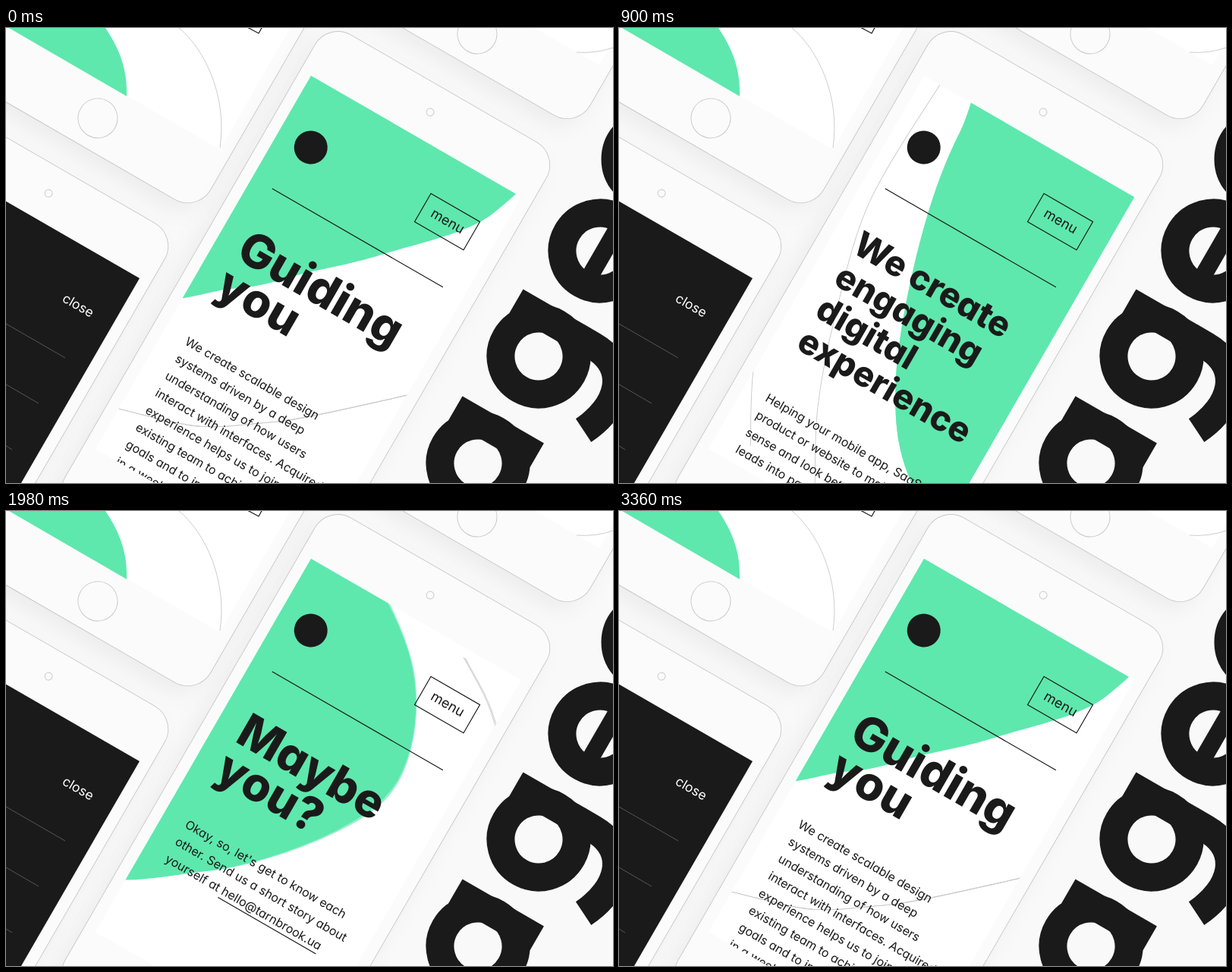
An HTML page that plays this animation: 800 px wide and 600 px high, repeating every 3600 ms.

```html
<!DOCTYPE html>
<html lang="en">
<head>
<meta charset="utf-8">
<title>Phone screens</title>
<style>
html, body { margin: 0; height: 100%; overflow: hidden; background: #f9f9f9; }
svg { display: block; width: 100%; height: 100%; }
text { font-family: Inter, Lato, sans-serif; font-feature-settings: "cv11"; fill: #1a1a1a; }
.head { font-weight: 800; }
.body { font-size: 16px; }
.thin { fill: none; stroke: #c8c8c8; stroke-width: .9; }
.ink { fill: none; stroke: #1a1a1a; stroke-width: 1.2; }
.shade { filter: drop-shadow(-6px 14px 14px #0000000d); }
</style>
</head>
<body>
<svg viewBox="0 0 800 600">
  <defs>
    <g id="phone">
      <rect class="shade" x="-16" y="-73" width="352" height="728" rx="35" fill="#fbfbfb"/>
      <rect class="thin" x="-16" y="-73" width="352" height="728" rx="35"/>
      <circle class="thin" cx="160" cy="-37" r="5"/>
      <circle class="thin" cx="160" cy="613" r="26"/>
      <rect width="320" height="568" fill="#fff"/>
    </g>
    <clipPath id="screen"><rect width="320" height="568"/></clipPath>
  </defs>

  <!-- neighbouring phones -->
  <use href="#phone" transform="translate(288.9 -491.9) rotate(30)"/>
  <path d="M4 0H131C150 28 160 55 159 90Z" fill="#5ee8ad"/>
  <path class="thin" d="M228 0C262 28 292 90 282 158"/>
  <path class="ink" d="M318 -1L333 7L338 -2"/>
  <use href="#phone" transform="translate(788.9 -602.9) rotate(30)"/>
  <path class="thin" d="M752 32Q776 34 800 26"/>
  <use href="#phone" transform="translate(-101 170) rotate(30)"/>
  <path d="M0 228.5L176 330L20 600H0Z" fill="#1a1a1a"/>
  <path d="M0 390L78 435M0 470L43 495M0 551L8 556" stroke="#555" fill="none"/>
  <text transform="translate(73 360) rotate(30)" font-size="17.5" style="fill:#fff">close</text>

  <!-- oversized lettering running upwards -->
  <g fill="none" stroke="#1a1a1a" stroke-width="37">
    <g transform="translate(622 574) rotate(-60)">
      <circle r="50"/><path d="M48-62V62"/>
    </g>
    <g transform="translate(702 433) rotate(-60)">
      <circle r="50"/><path d="M48-62V55C48 113-5 125-55 100"/>
    </g>
    <g transform="translate(783 294) rotate(-60)">
      <circle r="50"/><path d="M-50 5H50" stroke-width="23"/>
    </g>
    <circle cx="852" cy="173" r="49"/>
  </g>

  <!-- main phone -->
  <g transform="translate(402 63) rotate(30)">
    <use href="#phone"/>
    <g clip-path="url(#screen)">
      <path id="trail" fill="#5ee8ad" opacity=".65"/>
      <path id="blob" fill="#5ee8ad"/>
      <path id="line" class="thin"/>
      <path id="line2" class="thin"/>
      <g id="pages"></g>
    </g>
    <circle cx="47" cy="82" r="22" fill="#1a1a1a"/>
    <path class="ink" d="M30 154.5H290M214.5 55.5H289V98.5H214.5Z"/>
    <text x="228" y="82" font-size="18">menu</text>
  </g>
</svg>
<script>
const $ = id => document.getElementById(id);
const LOOP = 3600, FADE = 120;

const pages = [
  { size: 62, y: 258, step: 56, head: ['Guiding', 'you'], bodyY: 390,
    body: ['We create scalable design', 'systems driven by a deep', 'understanding of how users',
      'interact with interfaces. Acquired', 'experience helps us to join the', 'existing team to achieve your',
      'goals and to increase value', 'in a week'] },
  { size: 46, y: 249, step: 49, head: ['We create', 'engaging', 'digital', 'experience'], bodyY: 476,
    body: ['Helping your mobile app, SaaS', 'product or website to make', 'sense and look better, turn', 'leads into paying users'] },
  { size: 62, y: 259, step: 56, head: ['Maybe', 'you?'], bodyY: 390, rule: 'M117 448H266',
    body: ['Okay, so, let\'s get to know each', 'other. Send us a short story about', 'yourself at hello@tarnbrook.ua'] }
];

const rows = (list, y, step, attrs) =>
  list.map((s, i) => `<text x="32" y="${y + i * step}" ${attrs}>${s}</text>`).join('');
$('pages').innerHTML = pages.map(p => '<g>' +
  rows(p.head, p.y, p.step, `class="head" font-size="${p.size}"`) +
  rows(p.body, p.bodyY, 26.1, 'class="body"') +
  (p.rule ? `<path class="ink" d="${p.rule}"/>` : '') + '</g>').join('');

// Blob poses, clockwise, in screen coordinates
const guide  = [[295,-80],[298,38],[202,154],[128,225],[52,294],[-60,345],[-160,80],[80,-160]];
const shrink = [[305,-70],[247,33],[204,98],[139,184],[61,250],[-60,285],[-160,60],[80,-160]];
const sweep  = [[400,-110],[390,200],[290,330],[190,310],[90,270],[-30,200],[-60,40],[0,-160]];
const right  = [[420,-120],[480,250],[400,540],[254,473],[171,371],[107,200],[78,40],[90,-120]];
const left   = [[15,-50],[174,46],[240,170],[209,286],[83,428],[-80,505],[-200,250],[-100,-80]];
const away   = guide.map(([x, y]) => [x - 260, y - 260]);

// Hairline poses; the last pair is the offset of the second hairline
const lineA = [[322,300],[223,390],[167,433],[99,476],[0,507],[0,0]];
const lineS = [[322,269],[238,356],[171,400],[99,436],[0,460],[0,7]];
const lineB = [[144,537],[97,448],[57,333],[21,180],[24,-2],[-98,0]];
const lineC = [[244,-1],[292,30],[321,55],[350,90],[370,140],[0,0]];
const lineD = [[67,-1],[148,61],[253,162],[290,260],[326,339],[-65,20]];

const lin = p => p, easeIn = p => p * p, easeOut = p => 1 - (1 - p) ** 4;
const inOut = p => p < .5 ? 8 * p ** 4 : 1 - 8 * (1 - p) ** 4;

const blobKeys = [[0, guide], [30, guide], [360, shrink, easeIn], [540, sweep], [900, right, easeOut],
  [1200, right], [2220, left, inOut], [2430, left], [2830, away, easeIn], [2860, away],
  [3360, guide, easeOut], [LOOP, guide]];
const lineKeys = [[0, lineA], [30, lineA], [360, lineS, easeIn], [900, lineB, easeOut], [1200, lineB],
  [2220, lineC, inOut], [2430, lineC], [2850, lineD, inOut], [3360, lineA, easeOut], [LOOP, lineA]];

function poseAt(keys, t) {
  const i = keys.findIndex(k => k[0] > t);
  const [t0, a] = keys[i - 1], [t1, b, ease = lin] = keys[i];
  const p = ease((t - t0) / (t1 - t0));
  return a.map((pt, n) => pt.map((v, k) => v + (b[n][k] - v) * p));
}

// Catmull-Rom spline through the points
function spline(pts, closed) {
  const n = pts.length;
  const at = i => closed ? pts[(i + n) % n] : pts[Math.max(0, Math.min(n - 1, i))];
  let d = 'M' + pts[0];
  for (let i = 0; i < (closed ? n : n - 1); i++) {
    const [a, b, c, e] = [-1, 0, 1, 2].map(k => at(i + k));
    const ctrl = (p, q, r) => [p[0] + (r[0] - q[0]) / 6, p[1] + (r[1] - q[1]) / 6];
    d += `C${ctrl(b, a, c)} ${ctrl(c, e, b)} ${c}`;
  }
  return d;
}

function draw(now) {
  const t = now % LOOP;
  $('blob').setAttribute('d', spline(poseAt(blobKeys, t), true));
  $('trail').setAttribute('d', spline(poseAt(blobKeys, Math.max(0, t - 30)), true));
  const pts = poseAt(lineKeys, t), shift = pts.pop();
  $('line').setAttribute('d', spline(pts));
  $('line2').setAttribute('d', spline(pts));
  $('line2').setAttribute('transform', `translate(${shift})`);

  const [toB, toC, toA] = [30, 1200, 2430].map(s => Math.max(0, Math.min(1, (t - s) / FADE)));
  [1 - toB + toA, toB - toC, toC - toA].forEach((o, i) =>
    $('pages').children[i].setAttribute('opacity', o));
  requestAnimationFrame(() => draw(performance.now()));
}
draw(0);
</script>
</body>
</html>
```
